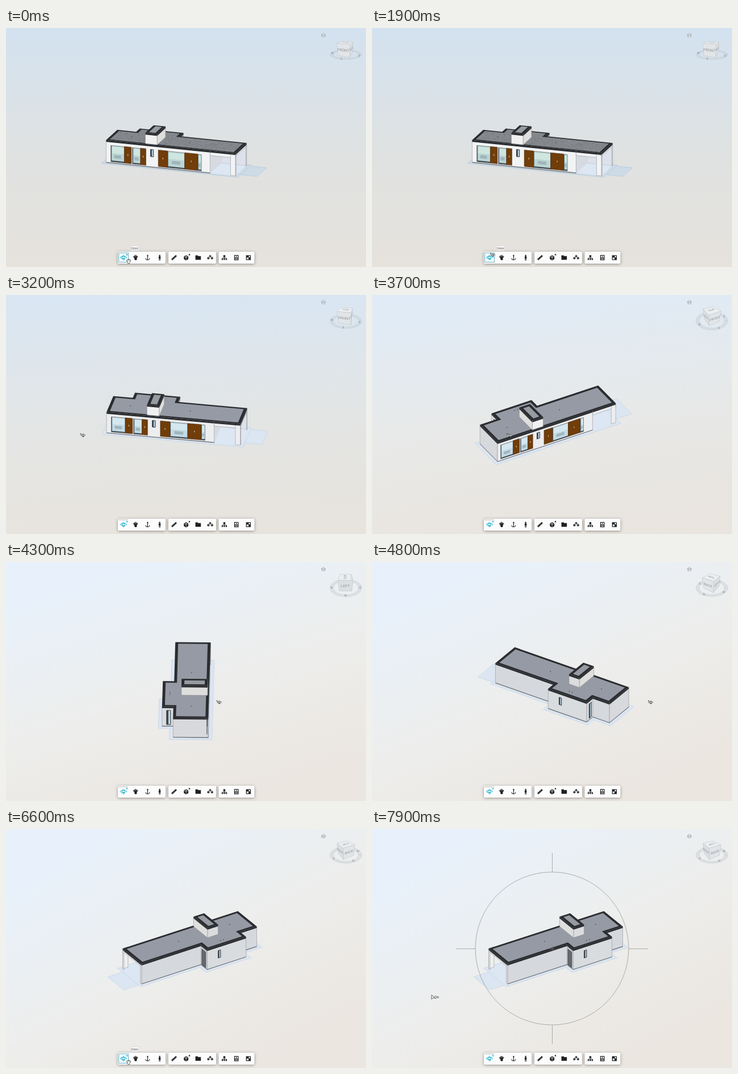
An HTML page with a canvas for the animation above (8000 ms loop, 634 by 422 pixels).

```html
<!DOCTYPE html>
<html lang="en">
<head>
<meta charset="utf-8">
<title>House orbit viewer</title>
<style>
html, body { margin: 0; width: 100%; height: 100%; overflow: hidden; background: #dfe2e3; }
canvas { display: block; width: 634px; height: 422px; }
</style>
</head>
<body>
<canvas id="stage" width="634" height="422"></canvas>
<script>
const ctx = document.getElementById('stage').getContext('2d');
const LOOP = 8000, STEP = 100;
const CENTER = { x: 317, y: 211 };
const ACCENT = '#27b4cc', INK = '#1d1f21', DARK = '#2a2c30', EDGE = '#85878a';

// House plan: main block, rear wing, chimney, carport
const LENGTH = 240, WIDTH = 62, HEIGHT = 42, FASCIA = 3.4;
const WING = { from: 35, to: 116, back: 82 };
const STACK = { from: 72, to: 94, front: 2.5, back: 48.5, top: 62 };
const CARPORT = 193;
const PIVOT = { x: 134.4, y: 41.5, z: 29.2 };

const clamp = (v, lo = 0, hi = 1) => Math.min(hi, Math.max(lo, v));
const mix = (a, b, k) => a + (b - a) * k;
const phase = (t, from, to) => clamp((t - from) / (to - from));

// ---- Camera ----
let ca, sa, ce, se;
function aim(t) {
  const s = clamp((t - 3200) / 1000, -0.2, 2.1);
  const azimuth = Math.min(18.5, 11 - 74 * s - 15.4 * s * s) * Math.PI / 180;
  const rise = phase(t, 2800, 3700) ** 0.74, settle = phase(t, 3700, 5300);
  const elevation = (17.8 + 17.7 * rise - 4.5 * settle) * Math.PI / 180;
  ca = Math.cos(azimuth); sa = Math.sin(azimuth);
  ce = Math.cos(elevation); se = Math.sin(elevation);
}
const turn = (x, y, z) => [x * ca + y * sa, (x * sa - y * ca) * se - z * ce];
const nearness = (x, y, z) => (x * sa - y * ca) * ce + z * se;
function project([x, y, z]) {
  const [px, py] = turn(x - PIVOT.x, y - PIVOT.y, z - PIVOT.z);
  return [CENTER.x + px, CENTER.y + py];
}

// ---- Drawing helpers ----
function path(points, closed = true) {
  ctx.beginPath();
  points.forEach(p => ctx.lineTo(...p));
  if (closed) ctx.closePath();
}
function paint(fill, line, width = 0.6) {
  if (fill) { ctx.fillStyle = fill; ctx.fill(); }
  if (line) { ctx.strokeStyle = line; ctx.lineWidth = width; ctx.stroke(); }
}
function placed(x, y, drawing) {
  ctx.save();
  ctx.translate(x, y);
  drawing();
  ctx.restore();
}
function label(text, x, y, size, color) {
  ctx.font = `${size}px Roboto, Arial, sans-serif`;
  ctx.textAlign = 'center';
  ctx.textBaseline = 'middle';
  ctx.fillStyle = color;
  ctx.fillText(text, x, y);
}
const box = (x0, y0, x1, y1) => [[x0, y0], [x1, y0], [x1, y1], [x0, y1]];
const alongX = y => (u, v) => [u, y, v];
const alongY = x => (u, v) => [x, u, v];
const level = z => (u, v) => [u, v, z];
function sheet(plane, outline, fill, line, width) {
  path(outline.map(([u, v]) => project(plane(u, v))));
  paint(fill, line, width);
}
function panel(plane, u0, v0, u1, v1, fill, line, width) {
  sheet(plane, box(u0, v0, u1, v1), fill, line, width);
}
function wall(plane, u0, u1, fill, z0 = 0, z1 = HEIGHT) {
  panel(plane, u0, z0, u1, z1, fill, EDGE, 0.5);
  if (!z0) panel(plane, u0, 0, u1, 1.3, '#6b6f74');
  panel(plane, u0, z1 - FASCIA, u1, z1, DARK);
}

// ---- House ----
function footprint(grow) {
  const wing = [WING.to + grow, WING.from - grow], back = WIDTH + grow, rear = WING.back + grow;
  return [[-grow, -grow], [LENGTH + grow, -grow], [LENGTH + grow, back], [wing[0], back],
    [wing[0], rear], [wing[1], rear], [wing[1], back], [-grow, back]];
}

function glazing(plane, u0, u1, textured) {
  panel(plane, u0, 2, u1, 32, textured ? '#bcd5d4' : '#c3dbe6', '#54595c', 0.7);
  panel(plane, u0 + 2, 18, u1 - 1, 30, textured ? '#cfe6e0' : '#d5e7ef');
  panel(plane, mix(u0, u1, .25), 9, mix(u0, u1, .75), 15, '#9fb6bb');
  panel(plane, u0, 2, u1, 4.2, '#3d4850');
  panel(plane, u0, 2, u0 + 1.5, 32, '#5a6468');
}
function door(plane, u0, u1) {
  panel(plane, u0, 2, u1, 32.5, '#713d08', '#40230a');
  const mid = (u0 + u1) / 2;
  panel(plane, mid - .6, 16, mid + .6, 19, '#d9c7a8');
}
function slit(plane, u0, u1, z0, z1) {
  panel(plane, u0, z0, u1, z1, '#bcd4e0', INK, 0.9);
  panel(plane, u0, z0, mix(u0, u1, .45), z1, '#3a4750');
}

function frontWall(textured) {
  const face = alongX(0), recess = alongX(2.5), white = textured ? '#f2f3f4' : '#ecedef';
  wall(face, 0, CARPORT, white);
  wall(face, CARPORT, LENGTH, white, 33);
  panel(face, 231, 0, LENGTH, HEIGHT - FASCIA, white, EDGE, 0.5);
  [[8, 33], [48, 63], [113, 145], [169, 176]].forEach(([a, b]) => glazing(recess, a, b, textured));
  [[33, 46], [63, 73], [96, 113], [145, 169]].forEach(([a, b]) => door(recess, a, b));
  slit(recess, 81.5, 87, 19, 32);
}

function carport() {
  sheet(level(0.2), box(CARPORT, 0, LENGTH, WIDTH), '#dce7f3');
  if (ca > 0) panel(alongX(WIDTH), CARPORT, 0, LENGTH, 38, '#dde1ec', '#b4b8be', 0.5);
  else panel(alongX(0), 229, 0, LENGTH, HEIGHT, '#eeeeee', EDGE, 0.5);
  if (sa > 0) panel(alongY(CARPORT), 0, 0, WIDTH, 38, '#d7dae1');
}

function mainBlock(textured) {
  carport();
  if (ca < 0) wall(alongX(WIDTH), 0, LENGTH, '#d5d9dd');
  if (sa > 0) {
    const end = alongY(LENGTH);
    wall(end, 0, WIDTH, '#e1e3e5', 36);
    [0, WIDTH - 4].forEach(u => panel(end, u, 0, u + 4, HEIGHT - FASCIA, '#e5e7e9', EDGE, 0.5));
  } else wall(alongY(0), 0, WIDTH, '#d8d9dc');
  if (ca > 0) frontWall(textured);
}

function rearWing() {
  const side = alongY(sa > 0 ? WING.to : WING.from), rear = alongX(WING.back);
  wall(side, WIDTH, WING.back, sa > 0 ? '#c5c9cd' : '#dadcdf');
  if (sa > 0) panel(side, 65, 2, 77, 34, '#66696d', INK);
  else slit(side, 74, 67, 4, 34);
  if (ca < 0) {
    wall(rear, WING.from, WING.to, '#d8dcdf');
    slit(rear, 93, 88, 17, 32);
  }
}

function speckle() {
  let seed = 7;
  const random = () => (seed = seed * 16807 % 2147483647) / 2147483647;
  for (let i = 0; i < 420; i++) {
    const [x, y] = project([mix(6, LENGTH - 6, random()), mix(6, WIDTH - 6, random()), HEIGHT]);
    ctx.fillStyle = random() < .5 ? 'rgba(190,193,198,.4)' : 'rgba(75,78,82,.35)';
    ctx.fillRect(x, y, 1.2, .8);
  }
}

function roof(textured) {
  const top = level(HEIGHT);
  sheet(top, footprint(0), DARK);
  sheet(top, footprint(-5), textured ? '#83868b' : '#969aa4');
  if (textured) speckle();
  [[144, 32], [37, 31], [80, 69], [74, 69]].forEach(([x, y]) => {
    const [px, py] = project([x, y, HEIGHT]);
    ctx.fillStyle = '#50545a';
    ctx.fillRect(px - .7, py - 1, 1.4, 1.8);
  });
}

function chimney() {
  const { from, to, front, back, top } = STACK;
  const side = (plane, a, b, fill) => wall(plane, a, b, fill, HEIGHT, top);
  side(alongX(ca > 0 ? front : back), from, to, ca > 0 ? '#f0f0f0' : '#dadcdd');
  side(alongY(sa > 0 ? to : from), front, back, '#dededd');
  panel(level(top), from, front, to, back, DARK);
  panel(level(top), from + 5, front + 5, to - 5, back - 5, '#969b a2'.replace(' ', ''));
}

function house(textured) {
  const pave = textured ? '#cddbe7' : '#dce6f2', rim = textured ? '#a9c1d6' : '#bccde0';
  sheet(level(0), box(LENGTH, 9, LENGTH + 37, WIDTH), pave, rim);
  sheet(level(0), footprint(6.5), pave, rim);
  if (ca > 0) { rearWing(); mainBlock(textured); }
  else { mainBlock(textured); rearWing(); }
  roof(textured);
  chimney();
}

// ---- Surroundings ----
function gradient(tilt, ...colors) {
  const g = ctx.createLinearGradient(CENTER.x - tilt, 0, CENTER.x + tilt, 422);
  colors.forEach((c, i) => g.addColorStop(i / 2, c));
  ctx.fillStyle = g;
  ctx.fillRect(0, 0, 634, 422);
}
function sky(t) {
  gradient(0, '#d3e2f0', '#dfe2e2', '#e6e2dc');
  ctx.globalAlpha = phase(t, 2800, 4300);
  gradient(mix(40, 110, phase(t, 3700, 5300)), '#e8f1fb', '#edeeed', '#ebe6e0');
  ctx.globalAlpha = 1;
}

function viewCube() {
  const R = 10.5, x0 = 598, y0 = 36, ringY = y0 + 1 + R * ce;
  const spot = point => {
    const [px, py] = turn(...point), k = 1 / (1 - nearness(...point) / 75);
    return [x0 + px * k, y0 + py * k];
  };
  ctx.beginPath();
  [28, 22].forEach(r => ctx.ellipse(x0 + .5, ringY, r, r * se, 0, 0, 7));
  ctx.fillStyle = 'rgba(190,196,202,.35)';
  ctx.fill('evenodd');
  paint(null, '#c4cacf', .5);
  [...'SENW'].forEach((letter, i) => {
    const a = i * Math.PI / 2, [px, py] = turn(25 * Math.sin(a), -25 * Math.cos(a), 0);
    label(letter, x0 + .5 + px, ringY + py, 5, '#83898e');
  });

  const down = [0, 0, -1], sx = Math.sign(sa), sy = Math.sign(ca);
  const face = (text, normal, right, below, shade) => {
    const corner = (i, j) => spot(normal.map((v, k) => R * (v + right[k] * i + below[k] * j)));
    path(box(-1, -1, 1, 1).map(([i, j]) => corner(i, j)));
    paint(shade, '#c0c6ca', .6);
    ctx.save();
    ctx.transform(...turn(...right), ...turn(...below), ...corner(0, 0));
    label(text, 0, 0, 7, '#8b9196');
    ctx.restore();
  };
  face('TOP', [0, 0, 1], [1, 0, 0], [0, -1, 0], '#eceff1');
  face(sy > 0 ? 'FRONT' : 'BACK', [0, -sy, 0], [sy, 0, 0], down, '#e2e5e8');
  face(sx > 0 ? 'RIGHT' : 'LEFT', [sx, 0, 0], [0, sx, 0], down, '#dbdfe2');
}

function homeButton() {
  placed(559, 12.5, () => {
    path([[-4, 0], [0, -3.5], [4, 0]]);
    ctx.rect(-2.7, 0, 5.4, 3);
    paint('#e4e9ed', '#8f979d', .7);
  });
}

// ---- Icons, each drawn around its own centre ----
const block = (x, y, w, h = w, fill = INK) => { ctx.fillStyle = fill; ctx.fillRect(x, y, w, h); };
const stroke = (points, width = 1.1, color = INK) => { path(points, false); paint(null, color, width); };
function dot(x, y, r, fill = INK) { ctx.beginPath(); ctx.arc(x, y, r, 0, 7); paint(fill); }
function arrowhead(x, y, r, angle, fill) {
  path([0, 1, 2].map(i => angle + i * Math.PI * 2 / 3).map(a => [x + r * Math.cos(a), y + r * Math.sin(a)]));
  paint(fill);
}
function cube(x, y, r) {
  path([0, 1, 2, 3, 4, 5].map(i => (i + .5) * Math.PI / 3).map(a => [x + r * Math.cos(a), y + r * Math.sin(a)]));
  paint(INK);
  stroke([[x - r * .8, y - r * .45], [x, y], [x + r * .8, y - r * .45]], .5, '#fff');
}
function orbitGlyph(color) {
  ctx.beginPath();
  ctx.ellipse(0, -.3, 5, 2, 0, .9, 6.9);
  paint(null, color, 1.1);
  ctx.beginPath();
  ctx.ellipse(0, 0, 1.6, 4.6, 0, 0, 7);
  paint(null, color, .8);
  arrowhead(.5, 2, 2, Math.PI, color);
}
function hand(color, grow = 0) {
  ctx.lineCap = 'round';
  for (let i = -2; i <= 2; i++) {
    const a = i * .42, reach = 5.8 - Math.abs(i) * .5;
    stroke([[0, 2], [reach * Math.sin(a), 1.5 - reach * Math.cos(a)]], 1.4 + grow, color);
  }
  dot(.2, 2.2, 2.3 + grow / 2, color);
  ctx.lineCap = 'butt';
}

const ICON_GROUPS = [
  [207, () => orbitGlyph(ACCENT), () => hand(INK), walk, person],
  [296, ruler, section, folder, explode],
  [384.5, tree, properties, expand]
];
function walk() {
  stroke([[0, -4.5], [0, 4]]);
  arrowhead(0, -3.6, 1.8, -Math.PI / 2, INK);
  ctx.beginPath();
  ctx.arc(0, .3, 3.7, .2, 2.94);
  paint(null, INK, 1.1);
}
function person() {
  dot(0, -3.8, 1.3);
  block(-1.7, -2.3, 3.4, 3.8);
  [-1.2, .2].forEach(x => block(x, 1, 1, 4));
}
function ruler() {
  stroke([[-4, 3.6], [4, -3.6]], 2.8);
  for (let i = -2; i <= 2; i++) block(i * 1.4, -i * 1.3, .6, .6, '#fff');
}
function section() {
  cube(0, .3, 4.6);
  stroke([[0, .3], [0, 4.5]], .6, '#fff');
  dot(0, -1.8, 1, '#fff');
}
function folder() {
  block(-4.8, -4, 4.4, 2);
  block(-4.8, -2.8, 9.6, 6.6);
}
function explode() {
  cube(0, -2.7, 2.1);
  [-3.2, 3.2].forEach(x => cube(x, .8, 2.3));
}
function tree() {
  block(-1.7, -4.3, 3.4);
  stroke([[0, -1], [0, 2]], .8);
  stroke([[-3.5, 2], [-3.5, .6], [3.5, .6], [3.5, 2]], .8);
  [-3.5, 0, 3.5].forEach(x => block(x - 1.2, 1.6, 2.4));
}
function properties() {
  block(-3.8, -4.6, 7.6, 9.2);
  block(-2.6, -3.5, 5.2, 3.2, '#fff');
  dot(0, -2, 1);
  [1, 2.8].forEach(y => block(-2.6, y, 5.2, .8, '#fff'));
}
function expand() {
  block(-4.2, -4.2, 8.4);
  block(-3, -.2, 3.2, 3.2, '#fff');
  block(.6, -3, 2.4, 2.4, '#fff');
}

function toolbar(hover) {
  ICON_GROUPS.forEach(([x, ...icons]) => {
    ctx.save();
    ctx.shadowColor = 'rgba(0,0,0,.38)';
    ctx.shadowBlur = 5;
    ctx.shadowOffsetY = 1;
    ctx.beginPath();
    ctx.roundRect(x - 10, 395, icons.length * 21, 21, 2);
    paint('#fcfcfc');
    ctx.restore();
  });
  if (hover) {
    ctx.beginPath(); ctx.rect(198.5, 397, 17, 16.5); paint('#f1fafc', '#72aec4', 1);
    ctx.beginPath(); ctx.rect(219.5, 384.5, 14, 8.5); paint('#f7f7f6', '#d1d2d2', .6);
    label('Orbit', 226.3, 389, 5.6, '#555');
  } else block(198, 396.5, 17, 1, '#aeb7b4');
  ICON_GROUPS.forEach(([x, ...icons]) => icons.forEach((icon, i) => placed(x + i * 21.2, 405.5, icon)));
  arrowhead(213, 400.2, 2, -Math.PI / 2, ACCENT);
  arrowhead(323, 400.2, 2, -Math.PI / 2, INK);
}

// ---- Pointer ----
const BUTTON = [216, 412], DRAG_START = [24, 222], DRAG_END = [609, 248], REST = [110, 297];
const between = (a, b, k, ky = k) => [mix(a[0], b[0], k), mix(a[1], b[1], ky)];
function pointerAt(t) {
  if (t < 1900) return BUTTON;
  if (t < 2600) return between([213, 401], DRAG_START, phase(t, 1900, 2500));
  if (t < 5500) {
    const p = phase(t, 2600, 5300);
    return between(DRAG_START, DRAG_END, p ** 1.1, clamp(p * 4.5));
  }
  if (t < 7200) return between(DRAG_END, BUTTON, phase(t, 5500, 6300));
  return between(BUTTON, REST, phase(t, 7200, 7900));
}
function orbitPointer() {
  ctx.scale(.8, .7);
  ctx.beginPath(); ctx.ellipse(0, 0, 5, 3, 0, 0, 7); paint('#f4f4f4');
  orbitGlyph('#484b4e');
  arrowhead(-5, -4, 2, -2.3, '#303234');
}
function rollPointer() {
  path([[-5, -4], [-5, 3.5], [-3, 1.5], [.5, 1.2]]);
  paint('#fff', '#333', .8);
  path([[-1, 0], [2, -2.5], [2, -1], [7, -1], [7, 1], [2, 1], [2, 2.5]]);
  paint('#fff', '#444', .8);
}
function handPointer() {
  ctx.scale(.75, .75);
  hand('#222', 1.6);
  hand('#fff');
}
function pointer(t) {
  const overButton = t < 1900 || (t >= 6200 && t < 7300);
  placed(...pointerAt(t), overButton ? handPointer : t < 6200 ? orbitPointer : rollPointer);
}

function orbitRing() {
  const r = 135, reach = 34, { x, y } = CENTER;
  ctx.beginPath();
  ctx.arc(x, y, r, 0, 7);
  [[-r - reach, -r], [-5, 5], [r, r + reach]].forEach(([a, b]) => {
    ctx.moveTo(x + a, y + .5); ctx.lineTo(x + b, y + .5);
    ctx.moveTo(x + .5, y + a); ctx.lineTo(x + .5, y + b);
  });
  paint(null, 'rgba(125,128,122,.6)', 1);
}

function draw(t) {
  aim(t);
  sky(t);
  house(t < 2900);
  viewCube();
  homeButton();
  if (t >= 6800) orbitRing();
  toolbar(t < 2000 || (t >= 6300 && t < 7300));
  pointer(t);
}

let start;
function loop(now) {
  start ??= now;
  draw(Math.floor((now - start) % LOOP / STEP) * STEP);
  requestAnimationFrame(loop);
}
requestAnimationFrame(loop);
</script>
</body>
</html>
```
